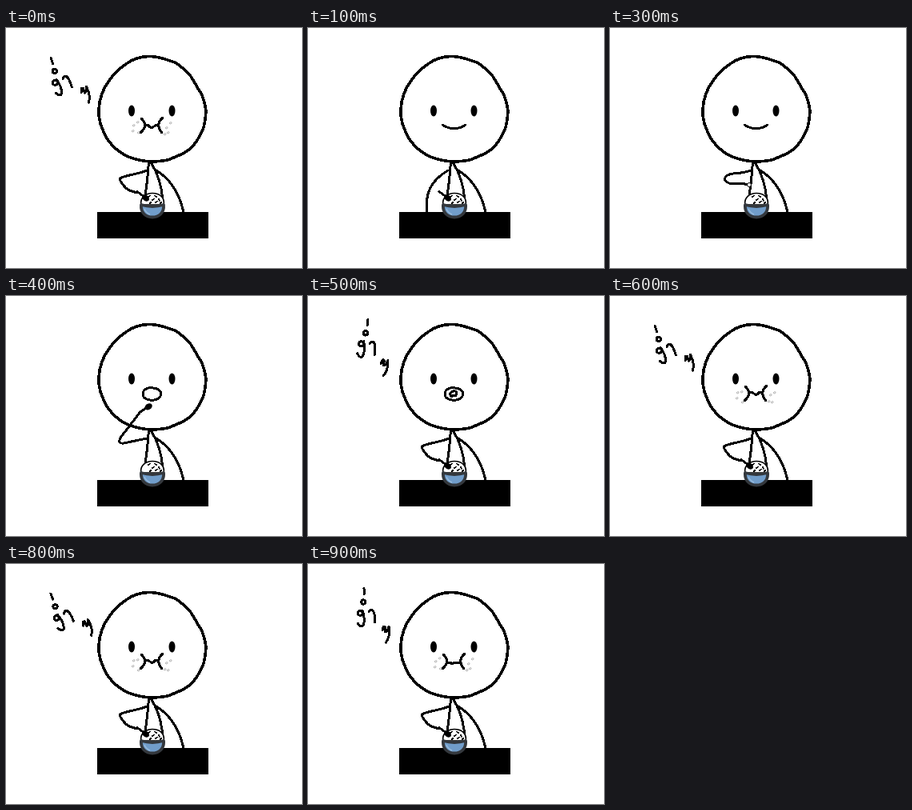
Recreate the animation shown at these times as an HTML page. Size 370 px wide and 300 px high, loop 1000 ms.

```html
<!DOCTYPE html>
<html lang="th">
<head>
<meta charset="utf-8">
<title>Eating rice</title>
<style>
  html, body { margin: 0; width: 100%; height: 100%; overflow: hidden; background: #fff; }
  svg { display: block; }
  .ink { fill: none; stroke: #000; stroke-width: 3; stroke-linecap: round; stroke-linejoin: round; shape-rendering: crispEdges; }
</style>
</head>
<body>
<svg width="370" height="300" viewBox="0 0 370 300">
  <path class="ink" style="stroke-width:3.6" d="M178 35.500C191 35 201 40 211 43C218 46 223 53 230 59C235 66 238 73 244 82C248 90 249 97 250 104C249 113 249 120 246 127C242 136 238 144 231 150C223 158 213 160 205 164C196 167 189 167 180 167C167 166 156 163 147 158C137 152 130 145 125 136C119 124 115 114 116 101C117 88 120 78 128 67C134 58 141 51 150 45C159 38 167 36 178 35.500Z"/>
  <ellipse cx="157" cy="103.500" rx="4" ry="7"/>
  <ellipse cx="207.500" cy="103.500" rx="4" ry="7"/>
  <path class="ink" d="M178.500 168Q177 192 173 216M181 168Q194 188 196 216M186 177C204 187 216 204 222 230"/>
  <path class="ink" id="arm"/>
  <circle id="hand" cx="174" cy="196" r="2.500" fill="#fff" stroke="#000"/>
  <path d="M114 230H253V263H114Z"/>
  <path d="M169 221C167 212 175 206.500 183 206.500C192 206.500 199 212 197 221Z" fill="#fff" stroke="#000" stroke-width="1.600"/>
  <path class="ink" style="stroke-width:1.500" d="M178 211l2-1M186 210l2 1M191 214l1 2M183 215l2-1M187 218l2-1M180 219l1-1M193 219l1-1"/>
  <path d="M169 221Q183 225 197 221C198 231 191 236.500 183 236.500C175 236.500 168 231 169 221Z" fill="#719dca" stroke="#34383d" stroke-width="3.800" stroke-linejoin="round"/>
  <path d="M173 226Q175 231 180 233" fill="none" stroke="#9bbddd" stroke-width="1.500"/>
  <g id="spoon">
    <path class="ink" d="M164 204.500L174 212"/>
    <ellipse cx="174.500" cy="212.500" rx="5" ry="3.600" transform="rotate(38 174.500 212.500)"/>
  </g>
  <path class="ink" id="mouth"/>
  <path id="crumbs" fill="#fff" stroke="#aaa" stroke-width=".9"/>
  <g class="ink" id="sound">
    <path d="M70 30.500V38M66.500 47.500a2.700 2.700 0 1 0 5.400 0a2.700 2.700 0 1 0-5.400 0"/>
    <path d="M68 60a3 3 0 1 0-1 4Q69 63 68 58Q72 69 69 77Q66 80 62 74"/>
    <path d="M76 60Q78 56 81 58Q84 62 83.500 73"/>
    <path d="M93 83Q94 76 96.500 79L96.500 85Q100 84 101 78Q103 91 97.500 98"/>
  </g>
</svg>
<script>
const $ = id => document.getElementById(id);

const arms = {
  rest: 'M175 178C153 191 146 207 149 230',
  reach: 'M176 178C168 182 156 183 147 186C139 188 143 191 147 197Q152 204 165 206',
  lift: 'M176 178Q169 181 154 182C141 184 141 191 149 194Q158 194 165 194L172 196',
  feed: 'M176 178L147 184C139 185 141 179 147 172L167 146'
};
const smile = 'M168 121Q183 130.5 197 121';
const open = 'M171 123C171 116 178 114 184 115C192 116 195 120 193 125C190 131 181 131 176 129Q171 127 171 123';
const rice = 'M180 126Q176 123 179 120Q185 117 186 121Q186 126 181 124';
const chew = wave => 'M169 113Q179 122 168 131M196 112Q186 121 195 131' + wave;
const waves = {
  soft: 'M174 122Q177 120 179 123T185 123T191 122',
  low: 'M174 123L177 124L180 126L183 123L186 125L188 123L191 125',
  high: 'M174 121Q177 119 180 122T185 122T191 121',
  flat: 'M174 123L178 123L180 125L183 123L188 124L191 122'
};

// arm, mouth, sound [angle, dx, dy], crumb shift
const steps = [
  ['reach', chew(waves.soft), [-18, -2, 2], 0],
  ['rest', smile],
  ['reach', smile],
  ['lift', smile],
  ['feed', open],
  ['reach', open + rice, [7, 0, 0]],
  ['reach', chew(waves.high), [-18, -2, 2], 1],
  ['reach', chew(waves.low), [12, 0, 0], -1],
  ['reach', chew(waves.high), [-22, 0, 0], 1],
  ['reach', chew(waves.flat), [0, 0, 0], 0]
];

const spots = [[158, 122], [163, 118], [157, 129], [164, 131], [199, 125], [204, 119], [197, 133], [201, 131]];

function set(id, name, value) {
  $(id).setAttribute(name, value);
}

function show(id, on) {
  set(id, 'visibility', on ? 'visible' : 'hidden');
}

function crumbs(shift) {
  return spots.map(([x, y], i) => `M${x} ${y + shift * (i % 2 ? 2 : -1)}q3-3 3 0q-1 2-3 0`).join('');
}

const start = performance.now();

function frame() {
  const step = Math.floor((performance.now() - start) / 100) % steps.length;
  const [arm, mouth, sound, shift] = steps[step];
  const chewing = shift !== undefined;
  set('arm', 'd', arms[arm]);
  set('mouth', 'd', mouth);
  set('spoon', 'transform', arm === 'feed' ? 'translate(3 -59) rotate(-70 164 204.5)' : '');
  show('hand', arm === 'lift');
  show('spoon', arm !== 'lift');
  show('crumbs', chewing);
  show('sound', sound);
  if (chewing) set('crumbs', 'd', crumbs(shift));
  if (sound) {
    const [angle, dx, dy] = sound;
    set('sound', 'transform', `translate(${dx} ${dy}) rotate(${angle} 80 70)`);
  }
  requestAnimationFrame(frame);
}
frame();
</script>
</body>
</html>
```
